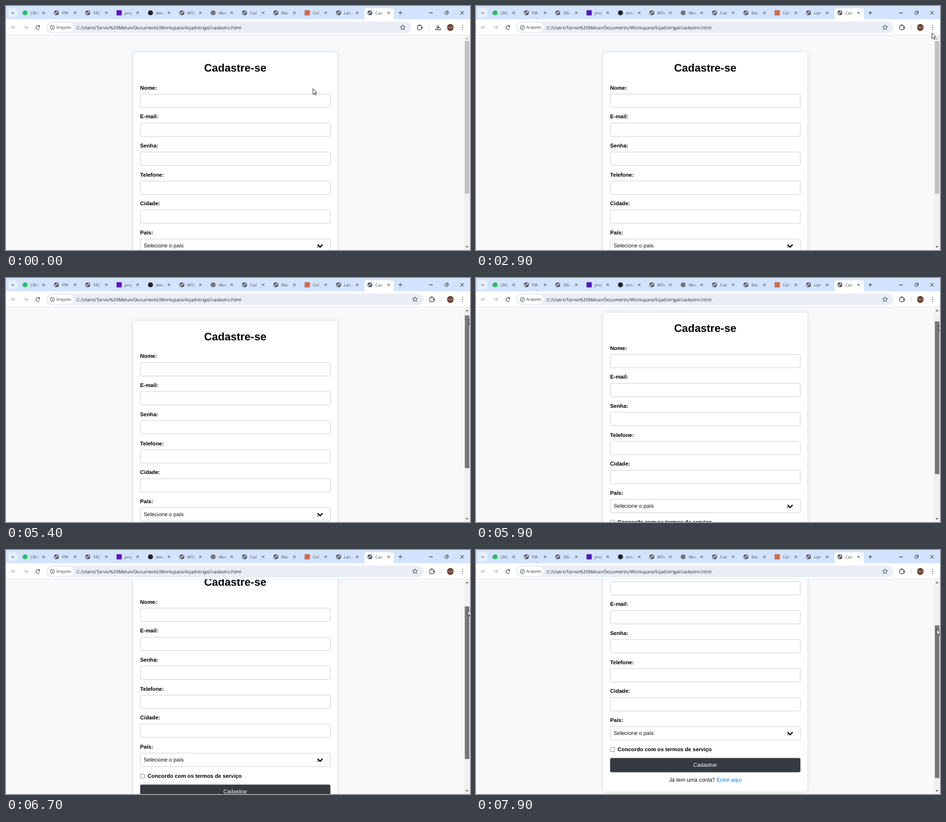
Animation of 712 by 376 pixels, one loop 8 s. Source, as an HTML page with a canvas:

```html
<!DOCTYPE html>
<html lang="pt-BR">
<head>
<meta charset="utf-8">
<title>Cadastre-se</title>
<style>
html, body { margin: 0; width: 100%; height: 100%; overflow: hidden; }
canvas { display: block; width: 712px; height: 376px; }
</style>
</head>
<body>
<canvas id="stage" width="712" height="376"></canvas>
<script>
const ctx = document.getElementById('stage').getContext('2d');
ctx.textRendering = 'geometricPrecision';

const LOOP = 8000, STEP = 100;
const UI = '"Open Sans", sans-serif';
const PAGE = '"Liberation Sans", Arial, sans-serif';
const BODY = '8.34px ' + PAGE, BOLD = 'bold ' + BODY;
const INK = '#3c4043', PALE = '#a9adb2';
const DRAG_START = 5200;
const TAB_PITCH = 48.1, FIELD_PITCH = 44.7, CENTER = 351.7;

// Moves hold their end value until the next one starts.
const move = (from, to, ...end) => ({ from, to, end });
const pointerMoves = [
  move(100, 400, 560, 158), move(400, 800, 694, 108),
  move(1000, 1600, 711, 86), move(1600, 2100, 711, 75),
  move(2500, 3100, 694, 25), move(3300, 3700, 274, 112),
  move(4000, 4100, 533, 82.5), move(4500, 4600, 711, 60)
];
const scrollMoves = [
  move(DRAG_START, 5900, 18), move(5900, 6700, 46),
  move(6700, 7400, 75), move(7400, 7900, 87)
];

function follow(start, moves, t) {
  return moves.reduce((value, { from, to, end }) => {
    const k = Math.min(1, Math.max(0, (t - from) / (to - from)));
    return value.map((v, i) => v + (end[i] - v) * k);
  }, start);
}

const thumbShift = scroll => scroll / 1.4;

function pointerAt(t, scroll) {
  if (t < DRAG_START) return follow([471, 127.5], pointerMoves, t);
  return [711 - scroll / 22, 60 + thumbShift(scroll)];
}

function rect(x, y, w, h, color) {
  ctx.fillStyle = color;
  ctx.fillRect(x, y, w, h);
}

function paint(fill, stroke, width) {
  if (fill) { ctx.fillStyle = fill; ctx.fill(); }
  if (stroke) { ctx.strokeStyle = stroke; ctx.lineWidth = width; ctx.stroke(); }
}

function roundRect(x, y, w, h, r, fill, stroke, width = 0.7) {
  ctx.beginPath();
  ctx.roundRect(x, y, w, h, r);
  paint(fill, stroke, width);
}

function disc(x, y, r, fill, stroke, width = 0.8) {
  ctx.beginPath();
  ctx.arc(x, y, r, 0, Math.PI * 2);
  paint(fill, stroke, width);
}

function line(x1, y1, x2, y2, color, width = 0.9) {
  ctx.beginPath();
  ctx.moveTo(x1, y1);
  ctx.lineTo(x2, y2);
  paint(null, color, width);
}

// An open V with its point at (x, y), turned by angle; 0 points down.
function chevron(x, y, size, angle, color, width) {
  ctx.save();
  ctx.translate(x, y);
  ctx.rotate(angle);
  ctx.beginPath();
  ctx.moveTo(-size, -size);
  ctx.lineTo(0, 0);
  ctx.lineTo(size, -size);
  ctx.restore();
  paint(null, color, width);
}

function triangle(x, y, half, height, color) {
  ctx.beginPath();
  ctx.moveTo(x - half, y);
  ctx.lineTo(x + half, y);
  ctx.lineTo(x, y + height);
  paint(color);
}

function cross(x, y, r, color) {
  line(x - r, y - r, x + r, y + r, color);
  line(x + r, y - r, x - r, y + r, color);
}

function text(s, x, y, font, color, align = 'left') {
  ctx.font = font;
  ctx.fillStyle = color;
  ctx.textAlign = align;
  ctx.fillText(s, x, y);
}

function globe(x, y) {
  disc(x, y, 3.7, '#53575c');
  disc(x - 1.4, y + 1, 1.2, '#dfe6f2');
  disc(x + 1.1, y - 1.2, 1.2, '#dfe6f2');
}

const dot = color => (x, y) => disc(x, y, 3.8, color);
const square = color => (x, y) => rect(x - 4, y - 4, 8, 8, color);

const tabs = [
  [dot('#25c05b'), '(365)'], [globe, 'PW'], [globe, 'SIS/'], [square('#5a12c4'), 'proj'],
  [dot('#1f2328'), 'ema'], [globe, 'MTe'], [dot('#74777b'), 'Mos'], [globe, 'Cad'],
  [globe, 'Res'], [square('#d9663f'), 'Con'], [globe, 'Lan'], [globe, 'Cad']
];

function drawTab([icon, title], i) {
  const x = 29.3 + TAB_PITCH * i;
  icon(x, 10.5);
  const fade = ctx.createLinearGradient(x + 16, 0, x + 22, 0);
  fade.addColorStop(0, '#44484d');
  fade.addColorStop(1, 'rgba(68,72,77,0)');
  text(title, x + 8.5, 13, '6.2px ' + UI, fade);
  cross(x + 28.5, 10.5, 1.9, INK);
}

function drawTabStrip() {
  rect(0, 0, 712, 21, '#d3e3fd');
  roundRect(3, 3.5, 14.5, 14, 4, '#e6effe');
  chevron(10.3, 11.6, 1.8, 0, '#1f1f1f', 1);
  roundRect(550, 3.5, 45, 18, [4.5, 4.5, 0, 0], '#fff');
  tabs.forEach(drawTab);

  line(602.2, 10.5, 607.8, 10.5, INK);
  line(605, 7.7, 605, 13.3, INK);
  line(649.3, 10.7, 654.7, 10.7, '#222');
  roundRect(674.8, 7.8, 4, 4, 1, null, '#222');
  roundRect(673.6, 9, 4, 4, 0.8, '#d3e3fd', '#222');
  cross(699.8, 10.5, 2.6, '#222');
}

function drawArrow(x, y, dir) {
  line(x - 3.3, y, x + 3.3, y, PALE);
  chevron(x + 3.3 * dir, y, 3.1, -dir * Math.PI / 2, PALE, 0.9);
}

function drawReload(x, y) {
  ctx.beginPath();
  ctx.arc(x, y, 3, 0.5, Math.PI * 1.78);
  paint(null, INK, 1);
  triangle(x + 2, y - 0.4, 1.6, -3, INK);
}

function drawStar(x, y) {
  ctx.beginPath();
  for (let i = 0; i < 10; i++) {
    const a = -Math.PI / 2 + i * Math.PI / 5, r = i % 2 ? 1.8 : 4.1;
    ctx.lineTo(x + r * Math.cos(a), y + r * Math.sin(a));
  }
  ctx.closePath();
  paint(null, INK, 0.8);
}

function drawExtension(x, y) {
  roundRect(x - 3.6, y - 3, 6.4, 6.6, 1, null, INK, 1);
  disc(x - 0.4, y - 3.4, 1.2, INK);
  disc(x + 3.1, y + 0.2, 1.2, INK);
}

function drawDownload(x, y) {
  line(x, y - 4, x, y + 1.4, INK, 1.1);
  chevron(x, y + 1.5, 2.5, 0, INK, 1.1);
  line(x - 3.7, y + 3.6, x + 3.7, y + 3.6, INK, 1.1);
  for (const side of [-3.7, 3.7]) line(x + side, y + 1.6, x + side, y + 4, INK, 1.1);
}

function drawAvatar(x, y) {
  const tone = ctx.createLinearGradient(0, y - 5, 0, y + 5);
  tone.addColorStop(0, '#3b2a22');
  tone.addColorStop(0.5, '#9a6a4a');
  tone.addColorStop(1, '#39302c');
  disc(x, y, 5.2, tone);
}

function drawToolbar(hasDownload) {
  const mid = 33, shift = hasDownload ? 0 : 18.8;
  rect(0, 20.5, 712, 24.5, '#fff');
  rect(0, 44.4, 712, 0.8, '#dfe4ec');
  drawArrow(11.5, mid, -1);
  drawArrow(30, mid, 1);
  drawReload(49, mid);

  roundRect(61.5, 24, 560.5 + shift, 18, 9, '#e9eef6');
  roundRect(64, 26, 40, 14, 7, '#fff');
  disc(71.2, mid, 3.1, null, INK);
  line(71.2, 32.4, 71.2, 34.8, INK, 0.8);
  line(71.2, 31, 71.2, 31.8, INK, 0.8);
  text('Arquivo', 77.2, 35.3, '6.3px ' + UI, '#2b2d30');
  text('C:/Users/Tarvio%20Melun/Documents/Workspace/lojadotrigal/cadastro.html',
    108.3, 35.5, '7.1px ' + UI, '#2b2d30');

  drawStar(608.8 + shift, mid);
  drawExtension(635 + shift, mid);
  rect(648.6 + shift, 29, 0.8, 8.5, '#c9dafa');
  if (hasDownload) drawDownload(663, mid);
  drawAvatar(681.8, mid);
  for (const dy of [-3, 0, 3]) disc(700.4, mid + dy, 0.8, INK);
}

function drawField(label, i) {
  const y = FIELD_PITCH * i;
  text(label, 205.8, 128.6 + y, BOLD, '#000');
  roundRect(206.1, 135.6 + y, 291.5, 20.6, 2.1, '#fff', '#c8c8c8');
}

function drawLoginHint(y) {
  const ask = 'Já tem uma conta? ', link = 'Entre aqui';
  ctx.font = BODY;
  const askWidth = ctx.measureText(ask).width;
  const left = CENTER - (askWidth + ctx.measureText(link).width) / 2;
  text(ask, left, y, BODY, '#111');
  text(link, left + askWidth, y, BODY, '#007bff');
}

function drawForm(scroll) {
  ctx.save();
  ctx.beginPath();
  ctx.rect(0, 45, 703, 331);
  ctx.clip();
  rect(0, 45, 703, 331, '#f8f9fa');
  ctx.translate(0, -scroll);

  ctx.shadowColor = 'rgba(0,0,0,0.12)';
  ctx.shadowBlur = 6;
  roundRect(195.5, 71.4, 312.8, 387.8, 4.2, '#fff');
  ctx.shadowColor = 'transparent';

  text('Cadastre-se', CENTER, 101, 'bold 16.68px ' + PAGE, '#000', 'center');
  ['Nome:', 'E-mail:', 'Senha:', 'Telefone:', 'Cidade:', 'País:'].forEach(drawField);
  text('Selecione o país', 211.2, 371.9, BODY, '#111');
  chevron(482, 371.6, 3.8, 0, '#111', 2);
  rect(477.6, 370.8, 1.5, 1.5, '#222');

  roundRect(206.2, 391.2, 6.4, 6.4, 1.1, '#fff', '#767676');
  text('Concordo com os termos de serviço', 217.3, 396.8, BOLD, '#000');
  roundRect(205.8, 407.6, 292, 22, 2.1, '#343a40');
  text('Cadastrar', CENTER, 421.3, BODY, '#fff', 'center');
  drawLoginHint(444.2);
  ctx.restore();
}

function drawScrollbar(scroll, t) {
  const thumb = t >= 5000 ? '#787878' : t >= 4600 ? '#a8a8a8' : '#c1c1c1';
  rect(703, 45, 9, 331, '#f1f1f1');
  rect(704.1, 54 + thumbShift(scroll), 6.9, 235.3, thumb);
  triangle(707.5, 51.2, 2.1, -2.3, scroll > 0 ? '#505050' : '#a3a3a3');
  triangle(707.5, 370.1, 2.1, 2.3, '#505050');
}

function drawPointer([x, y]) {
  ctx.beginPath();
  ctx.moveTo(x, y);
  ctx.lineTo(x, y + 8.6);
  ctx.lineTo(x + 2, y + 6.8);
  ctx.lineTo(x + 3.4, y + 9.9);
  ctx.lineTo(x + 4.8, y + 9.3);
  ctx.lineTo(x + 3.5, y + 6.3);
  ctx.lineTo(x + 6, y + 6.1);
  ctx.closePath();
  paint('#fff', '#222', 0.8);
}

function draw(now) {
  const t = Math.floor((now % LOOP) / STEP) * STEP;
  const [scroll] = follow([0], scrollMoves, t);
  drawForm(scroll);
  drawScrollbar(scroll, t);
  drawTabStrip();
  drawToolbar(t < 2700);
  drawPointer(pointerAt(t, scroll));
}

const start = performance.now();
function loop() {
  draw(performance.now() - start);
  requestAnimationFrame(loop);
}
loop();
</script>
</body>
</html>
```
